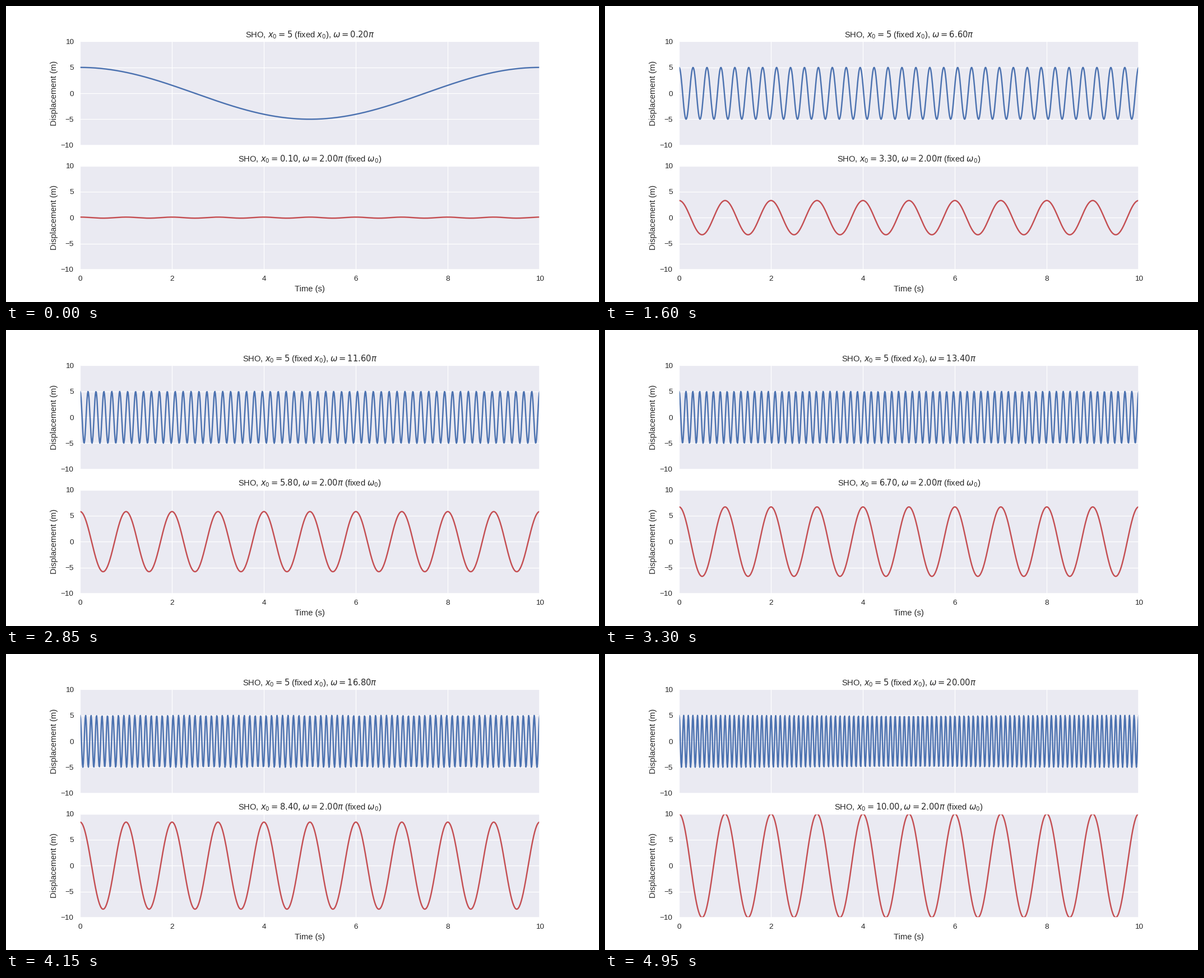
A matplotlib script that plays this animation: 1058 px wide and 529 px high, repeating every 5 s.

```python
import numpy as np
import matplotlib.pyplot as plt
from matplotlib.animation import FuncAnimation

FRAMES = 100
INTERVAL = 50  # ms
INK = "#262626"
BLUE, RED = "#4C72B0", "#C44E52"

plt.rcParams.update({
    "font.family": "Liberation Sans",
    "mathtext.fontset": "dejavusans",
    "text.color": INK,
    "axes.labelcolor": INK,
    "axes.facecolor": "#EAEAF2",
    "axes.edgecolor": "white",
    "axes.linewidth": 1.25,
    "axes.axisbelow": True,
    "axes.grid": True,
    "axes.labelsize": 12,
    "axes.titlesize": 12,
    "grid.color": "white",
    "grid.linewidth": 1,
    "lines.solid_capstyle": "round",
})
for axis, side in (("xtick", "bottom"), ("ytick", "left")):
    plt.rcParams.update({
        f"{axis}.{side}": False,
        f"{axis}.color": INK,
        f"{axis}.labelsize": 11,
        f"{axis}.major.size": 6,
    })

fig, (top, bottom) = plt.subplots(2, 1, sharex=True, figsize=(12, 6), dpi=529 / 6)
t = np.linspace(0, 10, 1000)


def setup(ax, color):
    ax.set(xlim=(0, 10), ylim=(-10, 10), ylabel="Displacement (m)")
    ax.set_yticks(range(-10, 11, 5))
    return ax.plot([], [], color=color, lw=2)[0]


freq_line = setup(top, BLUE)
amp_line = setup(bottom, RED)
bottom.set_xlabel("Time (s)")


def update(frame):
    omega = 0.2 * (frame + 1)  # in units of pi
    x0 = 0.1 * (frame + 1)
    freq_line.set_data(t, 5 * np.cos(omega * np.pi * t))
    amp_line.set_data(t, x0 * np.cos(2 * np.pi * t))
    top.set_title(rf"SHO, $x_0=5$ (fixed $x_0$), $\omega={omega:.2f}\pi$")
    bottom.set_title(rf"SHO, $x_0={x0:.2f}, \omega=2.00\pi$ (fixed $\omega_0$)")
    return freq_line, amp_line


anim = FuncAnimation(fig, update, frames=FRAMES, interval=INTERVAL, repeat=True)
plt.show()
```
